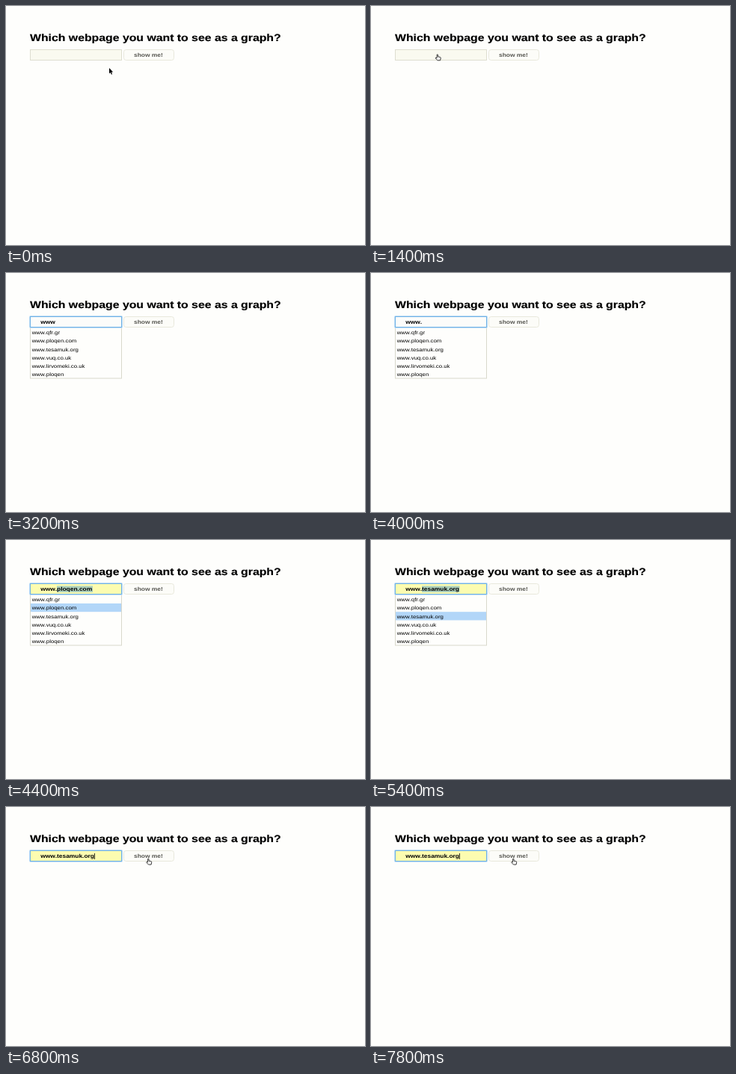
Write an HTML page that moves like this. It is 480 px wide and 320 px high and loops after 8000 ms.

```html
<!DOCTYPE html>
<html lang="en">
<head>
<meta charset="utf-8">
<title>Webpage graph form</title>
<style>
  html, body { margin: 0; width: 100%; height: 100%; overflow: hidden; background: #fefefc; }
  svg { display: block; width: 480px; height: 320px; }
  text {
    font-family: "Liberation Sans", Arial, sans-serif;
    font-size: 7.2px; font-weight: bold; font-kerning: none;
    text-rendering: geometricPrecision;
    transform: scaleX(1.17); transform-box: fill-box; transform-origin: left;
  }
  .title { font-size: 13.53px; stroke: #000; stroke-width: .15; }
  .row { font-size: 6.7px; font-weight: normal; }
  .label { fill: #555550; }
  .field { fill: #fafaf0; stroke: #deded0; }
  .button { fill: #fcfcf8; stroke: #e8e8dc; }
  .glow { fill: none; stroke: #c0def5; stroke-width: 2; }
  .focus { fill: #fcfcfa; stroke: #70b2e6; }
  .filled { fill: #fcfcb0; stroke: #70b2e6; }
  .menu { fill: #fefefc; stroke: #d8d8cc; }
  .active { fill: #b2d6f8; }
  .selection { fill: #add0bc; }
  .hand { fill: #fefefc; stroke: #222; stroke-width: .9; stroke-linejoin: round; }
</style>
</head>
<body>
<svg viewBox="0 0 480 320">
  <text class="title" x="32" y="47">Which webpage you want to see as a graph?</text>

  <g id="menu" data-on="3000-5600">
    <rect class="menu" x="32.5" y="73.5" width="122" height="67.5"/>
  </g>

  <rect class="field" x="32.5" y="58.5" width="122" height="14"/>
  <g data-on="1800-8000">
    <rect class="glow" x="32" y="58" width="123" height="15" rx="1"/>
    <rect class="focus" x="32.5" y="58.5" width="122" height="14"/>
  </g>
  <rect class="filled" data-on="4200-8000" x="32.5" y="58.5" width="122" height="14"/>

  <rect class="button" x="157.5" y="58.5" width="67" height="14" rx="3"/>
  <text class="label" x="171" y="68.4">show me!</text>

  <rect class="selection" data-on="4200-4400" x="68" y="61.5" width="22" height="8.5"/>
  <rect class="selection" data-on="4400-4800" x="68" y="61.5" width="48" height="8.5"/>
  <rect class="selection" data-on="4800-5600" x="68" y="61.5" width="50.5" height="8.5"/>

  <text x="46" y="68.4"><tspan data-on="2800-8000">w</tspan><tspan data-on="3000-8000">w</tspan><tspan data-on="3200-8000">w</tspan><tspan data-on="3400-8000">.</tspan></text>
  <text data-on="4200-4400" x="68" y="68.4">qfr.gr</text>
  <text data-on="4400-4800" x="68" y="68.4">ploqen.com</text>
  <text data-on="4800-8000" x="68" y="68.4">tesamuk.org</text>

  <rect data-on="1800-2200" x="46" y="62" width=".8" height="8"/>
  <rect data-on="3400-3800" x="68.2" y="62" width=".8" height="8"/>
  <rect data-on="5600-6000 6600-7000 7600-8000" x="118" y="62" width=".8" height="8"/>

  <g id="cursor" data-on="0-2800 6200-8000">
    <path id="arrow" d="M0 0V7.4L1.7 5.9L2.9 8.7L4.1 8.2L2.9 5.5H5.2Z"/>
    <path id="hand" class="hand" d="M2.6 5.5V1.2a.7.7 0 0 1 1.4 0V3.6L6.9 4.1Q7.9 4.4 7.7 5.6L7.1 8.5H3.5L.8 5.7Q.7 4.6 1.6 4.7Z"/>
  </g>
</svg>
<script>
  const LOOP = 8000, STEP = 200, ROW = 11.25;
  const sites = ['qfr.gr', 'ploqen.com', 'tesamuk.org', 'vuq.co.uk', 'lirvomeki.co.uk', 'ploqen'];
  const activeTimes = ['4200-4400', '4400-4800', '4800-5600'];
  const byId = id => document.getElementById(id);

  function add(parent, tag, attrs, content = '') {
    const el = document.createElementNS('http://www.w3.org/2000/svg', tag);
    for (const name in attrs) el.setAttribute(name, attrs[name]);
    el.textContent = content;
    parent.append(el);
  }

  sites.forEach((site, i) => {
    const top = 73.7 + i * ROW;
    if (activeTimes[i]) {
      add(byId('menu'), 'rect', { class: 'active', 'data-on': activeTimes[i], x: 33, y: top, width: 121, height: ROW });
    }
    add(byId('menu'), 'text', { class: 'row', x: 34.5, y: top + 8.4 }, 'www.' + site);
  });

  const timed = [...document.querySelectorAll('[data-on]')].map(el => ({
    el, spans: el.dataset.on.split(' ').map(span => span.split('-').map(Number))
  }));

  const moves = [
    { start: 400, end: 1200, from: [138, 83], to: [85.5, 64.3] },
    { start: 6000, end: 6600, from: [85.5, 64.3], to: [187, 68.6] }
  ];

  function show(el, visible) {
    el.style.display = visible ? '' : 'none';
  }

  function draw(t) {
    for (const { el, spans } of timed) {
      const visible = spans.some(([a, b]) => t >= a && t < b);
      if (el.tagName === 'tspan') el.style.visibility = visible ? 'visible' : 'hidden';
      else show(el, visible);
    }
    const { start, end, from, to } = t < 6000 ? moves[0] : moves[1];
    const p = Math.min(1, Math.max(0, (t - start) / (end - start)));
    const eased = p * p * (3 - 2 * p);
    const [x, y] = from.map((v, i) => v + (to[i] - v) * eased);
    byId('cursor').setAttribute('transform', `translate(${x} ${y})`);
    const overControl = y < 73;
    show(byId('arrow'), !overControl);
    show(byId('hand'), overControl);
  }

  const origin = performance.now();
  function tick() {
    const t = (performance.now() - origin) % LOOP;
    draw(Math.floor(t / STEP) * STEP);
    requestAnimationFrame(tick);
  }
  tick();
</script>
</body>
</html>
```
